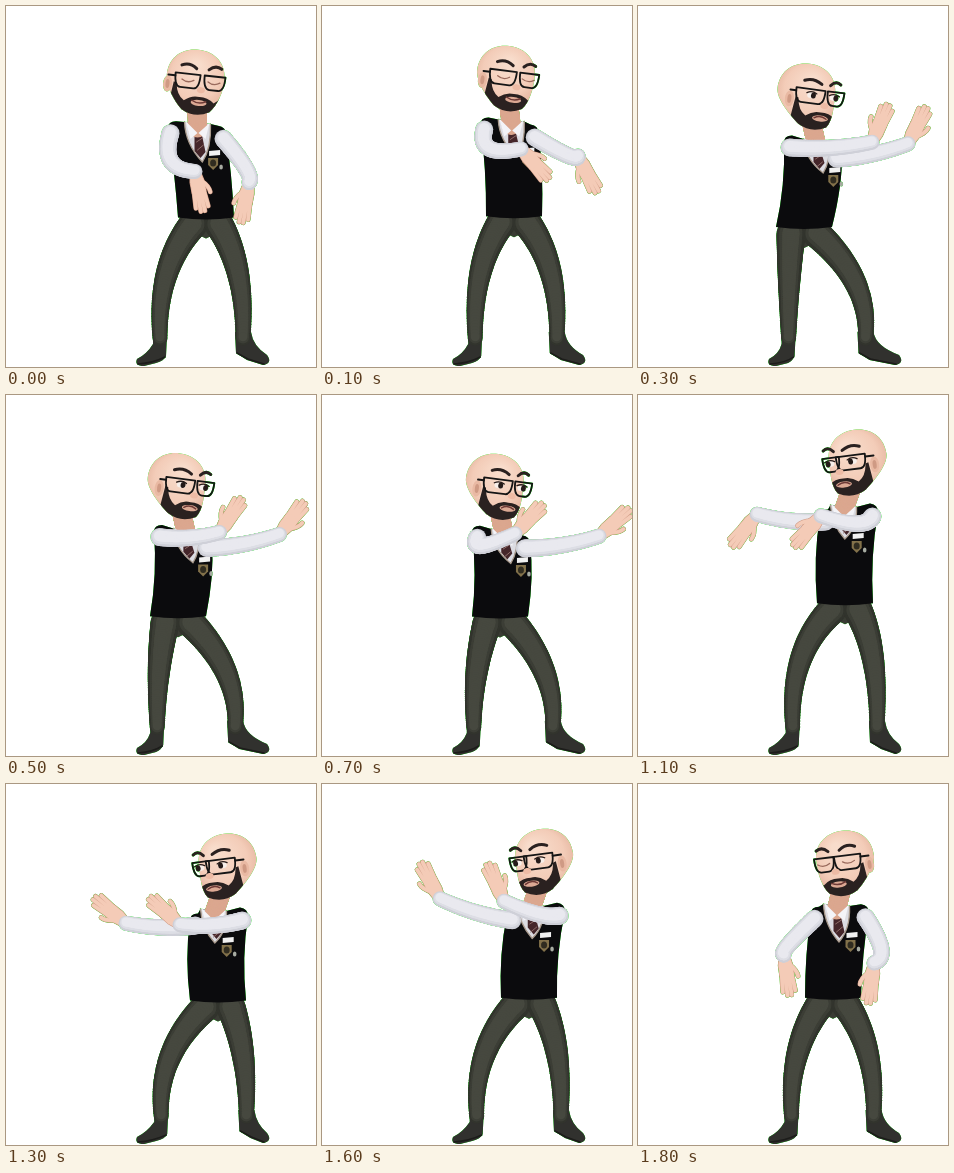
An HTML page with a canvas for the animation above (1.9 s loop, 310 by 361 pixels).

```html
<!DOCTYPE html>
<html lang="en">
<head>
<meta charset="utf-8">
<title>Dancing man</title>
<style>
  html, body { margin: 0; width: 100%; height: 100%; overflow: hidden; background: #fff; }
  canvas { display: block; filter: drop-shadow(0 0 .7px #0f0); }
</style>
</head>
<body>
<canvas id="stage" width="310" height="361"></canvas>
<script>
const ctx = document.getElementById('stage').getContext('2d');
const LOOP = 1900, STEP = 100;
const SKIN = '#f4cbb7', SKIN_DARK = '#cf9a84', HAIR = '#2a2120', FRAME = '#151515';

// x, y: base of the neck; hip: x of the waist; turn: facing, -1 left to 1 right.
// reach: middle of both wrists from the neck; gap: half their distance;
// drop: how far they hang below the neck; palm: hand direction in degrees.
const poses = [
  { at: 0, turn: .3, x: 191, y: 121, hip: 200, reach: 25, gap: 27, drop: 50, palm: 90 },
  { at: 200, turn: .8, x: 184, y: 116, hip: 184, reach: 55, gap: 30, drop: 6, palm: 20 },
  { at: 300, turn: .9, x: 175, y: 138, hip: 166, reach: 77, gap: 18, drop: -1, palm: -65 },
  { at: 700, turn: .85, x: 179, y: 139, hip: 178, reach: 56, gap: 42, drop: 1, palm: -44 },
  { at: 900, turn: .1, x: 193, y: 121, hip: 192, reach: 5, gap: 25, drop: 42, palm: 90 },
  { at: 1100, turn: -.9, x: 211, y: 115, hip: 207, reach: -60, gap: 32, drop: 5, palm: 130 },
  { at: 1300, turn: -.9, x: 213, y: 130, hip: 212, reach: -66, gap: 27, drop: 10, palm: 220 },
  { at: 1600, turn: -.85, x: 214, y: 125, hip: 207, reach: -64, gap: 32, drop: -9, palm: 244 },
  { at: 1800, turn: -.5, x: 202, y: 125, hip: 195, reach: -11, gap: 45, drop: 50, palm: 90 }
];
poses.push({ ...poses[0], at: LOOP });

const mix = (a, b, k) => a + (b - a) * k;

function poseAt(time) {
  const i = poses.findIndex(p => p.at > time), a = poses[i - 1], b = poses[i];
  const u = (time - a.at) / (b.at - a.at), k = u * u * (3 - 2 * u);
  return Object.fromEntries(Object.keys(a).map(key => [key, mix(a[key], b[key], k)]));
}

function fill(path, color) {
  ctx.fillStyle = color;
  ctx.fill(typeof path === 'string' ? new Path2D(path) : path);
}

function line(path, color, width) {
  ctx.strokeStyle = color;
  ctx.lineWidth = width;
  ctx.lineCap = ctx.lineJoin = 'round';
  ctx.stroke(new Path2D(path));
}

function oval(x, y, rx, ry, color) {
  ctx.beginPath();
  ctx.ellipse(x, y, rx, ry, 0, 0, 7);
  ctx.fillStyle = color;
  ctx.fill();
}

// Shaded limb bending smoothly through a joint; each shade is a thinner layer.
function limb([ax, ay], [jx, jy], [bx, by], from, to, shades) {
  const cx = 2 * jx - (ax + bx) / 2, cy = 2 * jy - (ay + by) / 2;
  shades.forEach((color, layer) => {
    for (let i = 0; i <= 50; i++) {
      const k = i / 50, r = mix(from, to, k) / 2 * (1 - layer * .2);
      oval(mix(mix(ax, cx, k), mix(cx, bx, k), k), mix(mix(ay, cy, k), mix(cy, by, k), k) - layer * .6, r, r, color);
    }
  });
}

function hand(x, y, angle, side) {
  ctx.save();
  ctx.translate(x, y);
  ctx.rotate(angle * Math.PI / 180);
  ctx.scale(1, side);
  let fingers = 'M10 4Q17 11 23 11';
  for (let s = -1.5; s < 2; s++) fingers += `M17 ${s * 3.2}L${41 - s * s * 2} ${s * 4.2}`;
  const palm = 'M0 -5L10 -7L21 -7Q26 0 21 7L10 7L0 5Z';
  line(fingers, SKIN_DARK, 4.8);
  line(palm, SKIN_DARK, 1.2);
  line(fingers, SKIN, 3.8);
  fill(palm, SKIN);
  ctx.restore();
}

function arm(p, side) {
  const { turn } = p, calm = 1 - Math.abs(turn);
  const sx = p.x + side * (23 + 5 * calm), sy = p.y + 9 + side * (1.5 + 4.5 * turn);
  const wx = p.x + p.reach + side * p.gap, wy = p.y + p.drop + side * 8 * calm;
  // A slack arm pushes its elbow outwards and down.
  const slack = Math.sqrt(Math.max(0, 900 - Math.hypot(wx - sx, wy - sy) ** 2 / 4));
  const elbow = [(sx + wx) / 2 + side * slack * .6, (sy + wy) / 2 + 3 + slack * .3];
  hand(wx, wy, p.palm + side * 16 * calm, side);
  limb([sx, sy], elbow, [wx, wy], 18, 15, ['#cfd0d8', '#dddee5', '#e9e9ef']);
}

function legs({ hip }, waist) {
  const leftAnkle = 154 + (hip - 200) * .1, rightAnkle = 237 + (hip - 200) * .28;
  const a = leftAnkle, b = rightAnkle;
  const shoes = [
    `M${a - 7} 329H${a + 7}L${a + 6} 350Q${a + 4} 355 150 357L138 360Q128 360 131 353Q141 348 ${a - 7} 338Z`,
    `M${b - 8} 326H${b + 8}Q${b + 10} 340 261 349Q267 357 257 359L${b + 4} 354L${b - 7} 347Z`
  ];
  shoes.forEach(shoe => fill(shoe, '#31312e'));
  line(`M132 358Q147 357 ${a + 5} 351M${b - 6} 347L${b + 5} 353L258 358`, '#1c1c1a', 1.5);
  fill(`M${hip - 27} ${waist - 4}H${hip + 27}L${hip + 23} ${waist + 10}L${hip} ${waist + 21}L${hip - 23} ${waist + 10}Z`, '#3a3c34');
  [[-1, leftAnkle], [1, rightAnkle]].forEach(([side, ankle]) => {
    const x = hip + side * 13, knee = mix(x, ankle, .8);
    limb([x, waist + 7], [knee, waist + 57], [ankle, 332], 29, 15, ['#32342d', '#3c3e36', '#46483f']);
  });
}

function torso({ x, y, hip, turn }, waist) {
  const slope = 1.5 + 4.5 * turn, bow = 6 * turn, midY = (y + waist) / 2;
  const l = x - 29, r = x + 29, ly = y - slope, ry = y + slope;
  const nx = x + 5 * turn - 1, depth = 38 - 10 * Math.abs(turn);
  fill(`M${l} ${ly + 4}Q${l} ${ly - 3} ${l + 8} ${ly - 3}L${nx - 13} ${y - 5}L${nx + 13} ${y - 3}` +
    `L${r - 8} ${ry - 4}Q${r} ${ry - 3} ${r} ${ry + 5}` +
    `Q${(r + hip + 28) / 2 + bow} ${midY} ${hip + 28} ${waist}Q${hip} ${waist + 4} ${hip - 28} ${waist}` +
    `Q${(l + hip - 28) / 2 + bow} ${midY} ${l} ${ly + 4}Z`, '#0b0b0d');
  ctx.save();
  ctx.translate(nx, y);
  const vee = `M-13 -5Q-12 ${depth * .5} ${4 + 3 * turn} ${depth}Q14 ${depth * .6} 13 -3`;
  fill(vee, '#dcdce2');
  fill(`M-3 6L4 6L8 ${depth - 10}L3 ${depth - 4}L-3 ${depth - 11}Z`, '#45262a');
  line('M-1 15L5 11M0 23L6 18', '#8d6b68', 1);
  line(vee, '#a99a8c', 1.3);
  ctx.restore();
  const bx = x + 14 + 7 * turn, by = y + 36;
  fill(`M${bx - 4} ${by - 12}l11 -1v5l-11 1Z`, '#f1f1f1');
  fill(`M${bx - 5} ${by - 5}h10v7l-5 5l-5 -5Z`, '#82714a');
  oval(bx, by, 3, 3.5, '#302c20');
  oval(bx + 8, by + 4, 1.8, 2.5, '#a7aca2');
}

function neck({ x, y, turn }, hx, hy) {
  const nx = x + 5 * turn - 1;
  limb([nx, y + 1], [(nx + hx) / 2 + 2 * turn, (y + hy + 20) / 2], [hx + 4 * turn, hy + 20], 19, 19, ['#dba78f']);
  fill(`M${nx - 12} ${y - 6}L${nx} ${y + 6}L${nx - 7} ${y + 12}ZM${nx + 12} ${y - 4}L${nx + 1} ${y + 6}L${nx + 8} ${y + 12}Z`, '#f4f4f8');
}

function head(turn, x, y) {
  const m = turn * 19, half = 14 - 3 * Math.abs(turn), open = Math.abs(turn) > .6;
  ctx.save();
  ctx.translate(x, y);
  ctx.rotate(.13 * Math.tanh(4 * turn));
  const face = new Path2D(`M-29 -3C-29 -20 -17 -31 0 -31C17 -31 29 -20 29 -3` +
    `C29 8 ${m * .5 + 22} 22 ${m * .6 + 14} 30Q${m * .6} 38 ${m * .6 - 14} 30C${m * .5 - 22} 22 -29 8 -29 -3Z`);
  const glow = ctx.createRadialGradient(m * .5 - 3, -15, 4, 0, 0, 38);
  glow.addColorStop(0, '#f8dccb');
  glow.addColorStop(.6, '#f3ccb8');
  glow.addColorStop(1, '#e0ae98');
  fill(face, glow);

  ctx.save();
  ctx.clip(face);
  ctx.translate(m, 0);
  fill('M-27 3L-24 4Q-23 16 -15 21Q-8 15 0 16Q8 15 15 21Q23 16 24 4L27 3L32 42L-32 42Z', HAIR);
  oval(0, 22, 8, 3, '#dba893');
  line(open ? 'M-6 22Q0 18 6 22' : 'M-7 20Q0 24 7 20', '#6d3a36', 1.5);
  ctx.restore();

  [-1, 1].forEach(side => {
    const ear = m + side * 33, ex = m + side * half;
    const w = 11.5 - 3.5 * side * turn, lens = ex + side * turn * 1.5;
    if (Math.abs(ear) < 32) {
      oval(ear, 6, 4.5, 8, '#e9b9a3');
      oval(ear, 6, 2, 4.5, SKIN_DARK);
      line(`M${lens + side * w} -3L${ear} -3`, FRAME, 2);
    }
    line(`M${ex - w * .6} ${-13 + side}Q${ex} -18 ${ex + w * .6} ${-13 - side}`, HAIR, 3);
    if (open) {
      oval(ex, 0, 4.5, 3, '#f7efea');
      oval(ex + turn * 2, 0, 2.5, 3, '#241a18');
      line(`M${ex - 5} -2Q${ex} -5 ${ex + 5} -2`, '#241a18', 1.3);
    } else line(`M${ex - 6} 0Q${ex} 4 ${ex + 6} 0`, '#9a6a5c', 1.3);
    line(`M${lens - w} -6H${lens + w}Q${lens + w} 8 ${lens + w - 6} 8H${lens - w + 6}Q${lens - w} 8 ${lens - w} -6Z`, FRAME, 1.8);
  });
  oval(m + turn * 3, 9, 4, 3, '#edbba5');
  ctx.restore();
}

function draw(time) {
  const p = poseAt(time), { turn } = p, waist = 145 + .55 * p.y;
  const hx = p.x + 1 - 9 * turn, hy = p.y - 45 - 5 * Math.abs(turn);
  ctx.clearRect(0, 0, 310, 361);
  legs(p, waist);
  torso(p, waist);
  neck(p, hx, hy);
  head(turn, hx, hy);
  const far = turn < 0 ? -1 : 1;
  arm(p, far);
  arm(p, -far);
}

function tick() {
  draw(Math.floor(performance.now() % LOOP / STEP) * STEP);
  requestAnimationFrame(tick);
}
tick();
</script>
</body>
</html>
```
